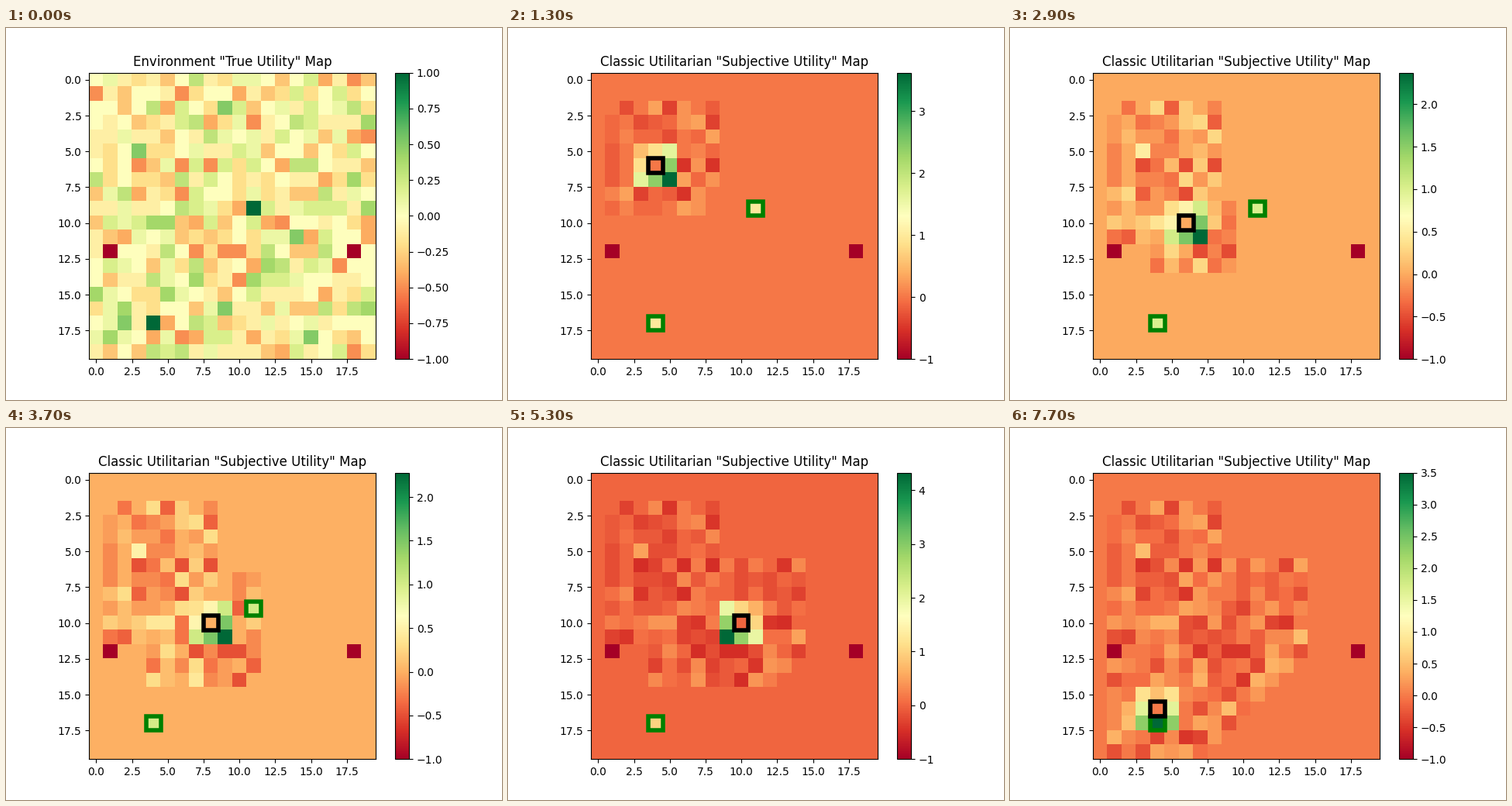
Animation, 640 px wide and 480 px high, one loop 8000 ms. Source, as a matplotlib script:

```python
import numpy as np
import matplotlib.pyplot as plt
from matplotlib.animation import FuncAnimation
from matplotlib.patches import Rectangle

SIZE, SIGHT = 20, 3
GOALS = [(9, 11), (17, 4)]
HAZARDS = [(12, 1), (12, 18)]
INTERVAL, FRAMES = 100, 80
START, STEP = 500, 400

# Corners of the walk, and (step, best expected utility) along it.
CORNERS = [(5, 5), (6, 4), (7, 5), (8, 4), (11, 7), (10, 8), (11, 9),
           (9, 11), (16, 4), (17, 4)]
HOPES = [(0, 3.45), (1, 3.62), (5, 2.37), (7, 2.28), (9, 3.5),
         (10, 4.2), (13, 4.58), (16, 4.2), (17, 3.5)]


def walk(corners):
    """Visit the corners one cell at a time, diagonals allowed."""
    path = [corners[0]]
    for corner in corners[1:]:
        while path[-1] != corner:
            move = np.sign(np.subtract(corner, path[-1]))
            path.append(tuple(int(v) for v in path[-1] + move))
    return path


def mark(grid, goals):
    for cell in goals:
        grid[cell] = 1
    for cell in HAZARDS:
        grid[cell] = -1
    return grid


def make_world():
    rng = np.random.default_rng(7)
    noise = rng.normal(-0.02, 0.25, (SIZE, SIZE))
    return mark(noise.round(1).clip(-0.5, 0.5), GOALS)


def outlook(step):
    """Utility of the 3x3 moves, highest in the direction of travel."""
    move = np.subtract(PATH[step + 1], PATH[step])
    dy, dx = np.mgrid[-1:2, -1:2]
    length = np.maximum(np.hypot(dy, dx), 1) * np.hypot(*move)
    ring = 0.45 + 0.3 * (dy * move[0] + dx * move[1]) / length
    ring[1, 1] = 0
    ring[tuple(move + 1)] = 1
    return ring * np.interp(step, *zip(*HOPES))


def goals_left(step):
    return [goal for goal in GOALS if goal not in PATH[:step + 1]]


def belief(step):
    """What the agent knows after the given step; -1 is before it looks."""
    grid = np.zeros((SIZE, SIZE))
    for r, c in PATH[:step + 1]:
        seen = np.s_[r - SIGHT:r + SIGHT + 1, c - SIGHT:c + SIGHT + 1]
        grid[seen] = WORLD[seen]
    for goal in GOALS:
        grid[goal] = 0
    mark(grid, goals_left(step))
    if step >= 0:
        r, c = PATH[step]
        grid[r - 1:r + 2, c - 1:c + 2] = outlook(step)
    return grid


def add_box(cell, color, zorder):
    r, c = cell
    return ax.add_patch(Rectangle((c - 0.5, r - 0.5), 1, 1, fill=False,
                                  edgecolor=color, linewidth=4, zorder=zorder))


PATH = walk(CORNERS)
WORLD = make_world()
fig, ax = plt.subplots(figsize=(6.4, 4.8), dpi=100)
image = ax.imshow(WORLD, cmap="RdYlGn", vmin=-1, vmax=1)
fig.colorbar(image, ax=ax)
title = ax.set_title("")
goal_boxes = [add_box(goal, "green", 3) for goal in GOALS]
agent_box = add_box(PATH[0], "black", 4)


def update(frame):
    time = frame * INTERVAL
    exploring = time >= START
    step = (time - START) // STEP - 1
    grid = belief(step) if exploring else WORLD
    image.set_data(grid)
    image.set_clim(-1, grid.max())
    title.set_text('Classic Utilitarian "Subjective Utility" Map' if exploring
                   else 'Environment "True Utility" Map')
    r, c = PATH[max(step, 0)]
    agent_box.set_xy((c - 0.5, r - 0.5))
    agent_box.set_visible(exploring)
    for goal, box in zip(GOALS, goal_boxes):
        box.set_visible(exploring and goal in goals_left(step))
    return [image, title, agent_box, *goal_boxes]


animation = FuncAnimation(fig, update, frames=FRAMES, interval=INTERVAL,
                          repeat=True, repeat_delay=0, blit=False)
plt.show()
```
